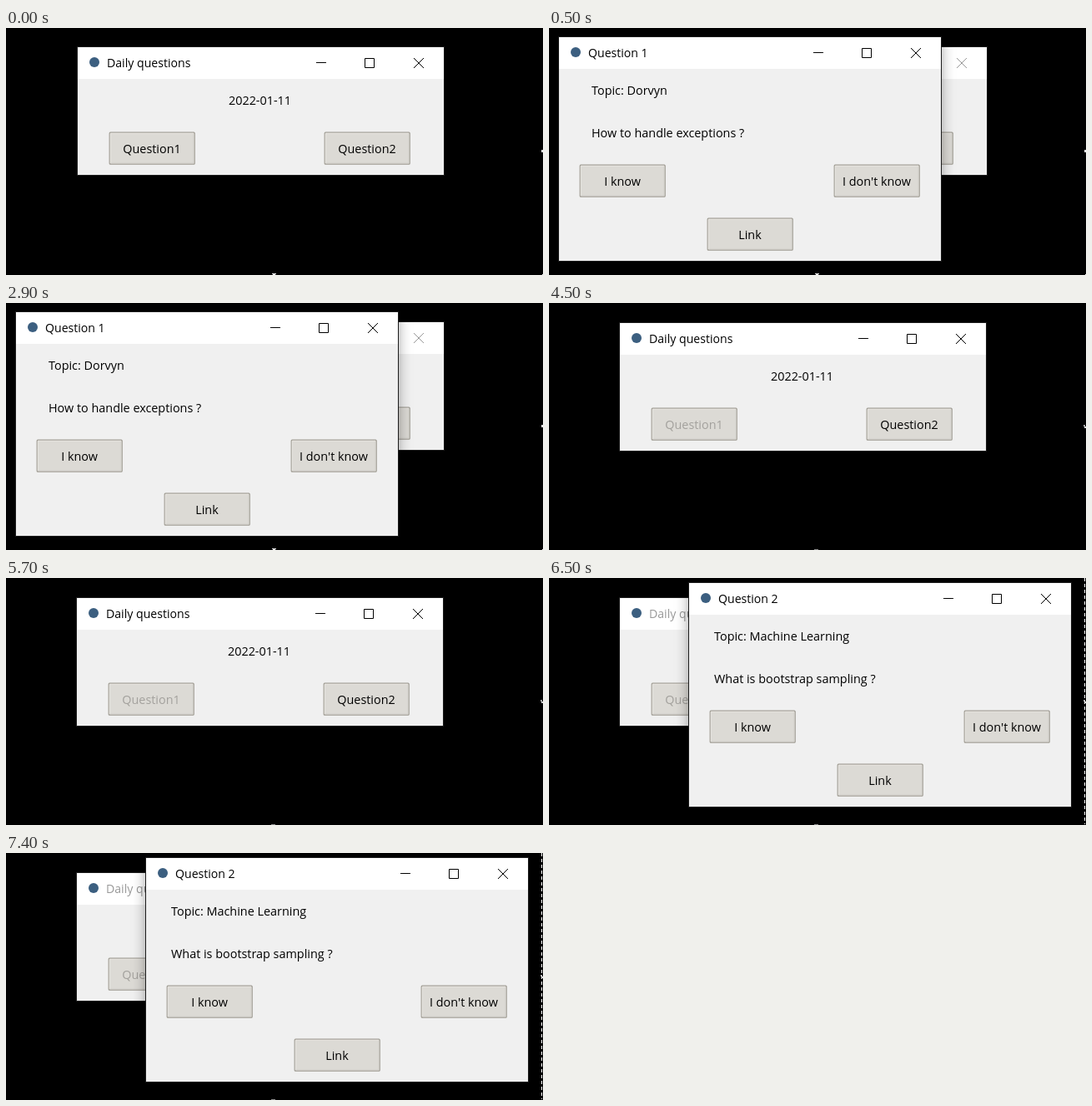
These frames come from a looping animation (644 px wide and 296 px high, 8000 ms). An HTML page:

```html
<!DOCTYPE html>
<html lang="en">
<head>
<meta charset="utf-8">
<title>Daily questions</title>
<style>
html, body { margin: 0; width: 100%; height: 100%; overflow: hidden; background: #000; }
svg { display: block; font: 14.4px "Open Sans", "Noto Sans", sans-serif; }
.title { font-size: 14.1px; }
.shadow { filter: drop-shadow(0 3px 8px rgba(0, 0, 0, .35)); }
</style>
</head>
<body>
<svg id="stage" width="644" height="296" viewBox="0 0 644 296"></svg>
<script>
const stage = document.getElementById('stage');

const rect = (x, y, w, h, fill, extra = '') =>
  `<rect x="${x}" y="${y}" width="${w}" height="${h}" fill="${fill}" ${extra}/>`;
const text = (x, y, label, extra = '') => `<text x="${x}" y="${y}" ${extra}>${label}</text>`;
const line = (d, stroke) => `<path d="${d}" fill="none" stroke="${stroke}"/>`;

function button(x, y, label, enabled = true) {
  return rect(x + .2, y + .2, 102, 38, '#dcdad5', 'rx="1" stroke="#9e9a91" stroke-width="1.2"') +
    line(`M${x + 1.3} ${y + 37}V${y + 1.3}H${x + 101}`, '#e8e5e0') +
    line(`M${x + 2} ${y + 37.1}H${x + 101.1}V${y + 2}`, '#cfcdc8') +
    text(x + 51, y + 25, label, `text-anchor="middle" fill="${enabled ? '#000' : '#a3a19d'}"`);
}

function windowFrame(x, y, w, h, title, active, body) {
  const ink = active ? '#000' : '#999';
  return `<g transform="translate(${x} ${y})">
    <g class="${active ? 'shadow' : ''}">${rect(-.5, -.5, w + 1, h + 1, '#f0f0f0', 'stroke="#1c1c1c"')}</g>
    ${rect(0, 0, w, 38, '#fff')}
    <circle cx="20" cy="18" r="6" fill="#3c5f80"/>
    ${text(35, 24, title, `class="title" fill="${ink}"`)}
    ${line(`M${w - 153} 18.5h12M${w - 94.5} 13.5h11v11h-11z`, ink)}
    ${line(`M${w - 36} 13l12 12m0 -12l-12 12`, ink)}
    ${body}</g>`;
}

const mainWindow = (x, y, active, firstOpen) =>
  windowFrame(x, y, 439, 153, 'Daily questions', active,
    text(218.5, 69, '2022-01-11', 'text-anchor="middle"') +
    button(38, 102, 'Question1', firstOpen) + button(296, 102, 'Question2'));

const questionWindow = (x, y, number, textX, topic, question) =>
  windowFrame(x, y, 458, 268, `Question ${number}`, true,
    text(textX, 69, `Topic: ${topic}`) + text(textX, 120, question) +
    button(25, 153, 'I know') + button(330, 153, "I don't know") + button(178, 217, 'Link'));

// Small remains of a selection border at the stage edges
const earlyHandles = rect(642, 146, 2, 3, '#ddd') + rect(319, 294, 5, 1, '#ddd') +
  rect(320, 295, 3, 1, '#fff') + rect(643, 295, 1, 1, '#fff');
const lateHandles = rect(641, 146, 2, 2, '#aaa') + rect(642, 148, 2, 2, '#ddd') + rect(318, 295, 5, 1, '#888');
const dashes = '<path d="M642.5 0V295" stroke="#fff" stroke-dasharray="4 3"/>';

const scenes = [
  [0, earlyHandles + mainWindow(86, 23, true, true)],
  [500, earlyHandles + mainWindow(86, 23, false, true) +
    questionWindow(12, 11, 1, 39, 'Dorvyn', 'How to handle exceptions ?')],
  [4500, lateHandles + mainWindow(85, 24, true, false)],
  [6500, lateHandles + dashes + mainWindow(85, 24, false, false) +
    questionWindow(168, 6, 2, 30, 'Machine Learning', 'What is bootstrap sampling ?')]
];

let shown;
function draw() {
  const time = performance.now() % 8000;
  const scene = scenes.findLast(([start]) => time >= start);
  if (scene !== shown) {
    shown = scene;
    stage.innerHTML = scene[1];
  }
  requestAnimationFrame(draw);
}
draw();
</script>
</body>
</html>
```
